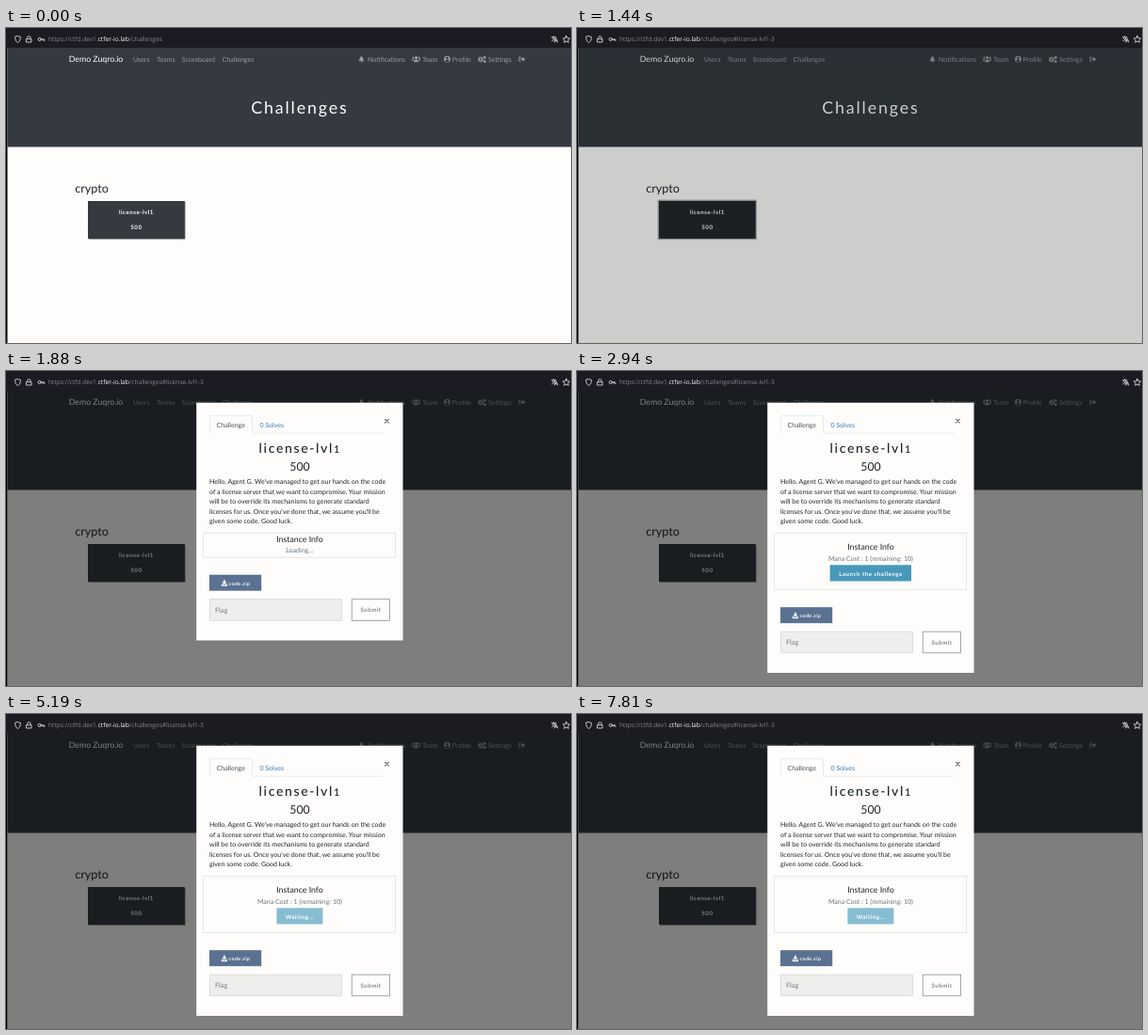
An HTML page that plays this animation: 600 px wide and 335 px high, repeating every 8000 ms.

```html
<!DOCTYPE html>
<html lang="en">
<head>
<meta charset="utf-8">
<title>Challenge page</title>
<style>
  html, body { margin: 0; width: 100%; height: 100%; overflow: hidden; background: #000; }
  svg { display: block; }
  text { font-family: Lato, sans-serif; font-size: 7.02px; text-rendering: geometricPrecision; white-space: pre; }
  .url { font-family: "Open Sans", sans-serif; font-size: 6.63px; fill: #87868c; }
  .nav { fill: #999c9f; }
  .nav text { font-size: 7.1px; }
  .line { fill: none; stroke-width: .9; stroke-linecap: round; stroke-linejoin: round; }
  .mid { text-anchor: middle; }
  .btn { font-size: 6.14px; font-weight: 700; letter-spacing: .5px; text-anchor: middle; }
  .h3 { font-size: 12.28px; }
  .h5 { font-size: 8.77px; text-anchor: middle; }
  .shadow { filter: drop-shadow(1.3px 1.3px .7px #808080); }
</style>
</head>
<body>
<svg width="600" height="335" viewBox="0 0 600 335">
  <!-- browser bar -->
  <rect width="600" height="21" fill="#1c1b22"/>
  <g class="line" stroke="#d5d5da">
    <path d="M12.5 8.6l2.9 1c0 3-.8 4.700-2.900 5.900c-2.100-1.200-2.900-2.900-2.900-5.900z"/>
    <path d="M22.800 11.500v-1.300a1.600 1.600 0 0 1 3.200 0v1.300M21.800 11.700h5.200v3.300h-5.200z"/>
    <path d="M37.500 12h3.300v1.500M39 12v1.200"/><circle cx="35.700" cy="12" r="1.600"/>
    <path d="M579.500 9.800h4.500M581.700 8.800v1M583.300 9.800c-.5 2-1.800 3.200-3.500 4M580.300 10.500c.6 1.400 1.500 2.200 2.500 2.800M582.500 15l1.700-4l1.700 4M583.200 13.800h2"/>
    <path d="M595 8.300l1.100 2.400l2.600.3l-1.900 1.800l.5 2.600l-2.300-1.300l-2.300 1.300l.5-2.600l-1.900-1.800l2.600-.3z"/>
  </g>
  <text class="url" x="45" y="14.300">https://ctfd.dev1.<tspan fill="#fbfbfe">ctfer-io.lab</tspan>/challenges<tspan id="hash">#license-lvl1-3</tspan></text>

  <!-- page -->
  <rect x="1.500" y="21" width="600" height="314" fill="#fefdfb"/>
  <rect x="1.500" y="21" width="600" height="105.500" fill="#343a40"/>
  <text x="66.700" y="36.300" fill="#fff" style="font-size:8.770px">Demo Zuqro.io</text>
  <g class="nav">
    <text x="135" y="35.800">Users</text>
    <text x="160" y="35.800">Teams</text>
    <text x="186.700" y="35.800">Scoreboard</text>
    <text x="229.600" y="35.800">Challenges</text>
    <text x="384" y="35.800">Notifications</text>
    <text x="442" y="35.800">Team</text>
    <text x="473.800" y="35.800">Profile</text>
    <text x="512" y="35.800">Settings</text>
    <path d="M374.600 35.200c1.200-1 .8-4.500 2.500-4.800v-.6h.8v.6c1.700.3 1.300 3.800 2.500 4.800zM376.600 35.700h1.800a.9.9 0 0 1-1.800 0z"/>
    <circle cx="435.600" cy="31.600" r="1.600"/><circle cx="432.500" cy="31.500" r="1"/><circle cx="438.700" cy="31.500" r="1"/>
    <path d="M432.900 36.300c0-3.600 5.400-3.600 5.400 0zM431 34.800c0-2 1.600-2.200 2.300-1.700l-1 1.700zM440.200 34.800c0-2-1.600-2.200-2.300-1.700l1 1.700z"/>
    <circle cx="468.500" cy="33.200" r="3.400"/>
    <g fill="#343a40"><circle cx="468.500" cy="32" r="1.300"/><path d="M466.300 35.400c.3-2.200 4.100-2.200 4.400 0c-1.300 1.100-3.100 1.100-4.400 0z"/></g>
    <g fill="none" stroke="#999c9f" stroke-width="1.200">
      <circle cx="504" cy="33.400" r="1.600"/><circle cx="508.300" cy="31.300" r=".9"/><circle cx="508.300" cy="35.400" r=".9"/>
      <circle cx="504" cy="33.400" r="2.500" stroke-dasharray="1 .960"/>
    </g>
    <path d="M546.800 30.600h-1.600q-.8 0-.8.800v3.600q0 .8.800.800h1.600v-.9h-1.400v-3.400h1.400zM546.700 32.300h2v-1.600l2.700 2.500l-2.700 2.500v-1.600h-2z"/>
  </g>
  <text x="260.200" y="90.500" fill="#fff" style="font-size:17.800px;letter-spacing:1.900px">Challenges</text>
  <text class="h3" x="73.200" y="174.500" fill="#212529" style="font-size:12.600px">crypto</text>
  <rect id="cardShadow" class="shadow" x="87" y="184" width="102.500" height="39.800" fill="#343a40"/>
  <rect id="ring" x="86.300" y="183.300" width="103.900" height="41.200" fill="none" stroke="#a8abad" stroke-width="1.400"/>
  <rect x="87" y="184" width="102.500" height="39.800" fill="#343a40"/>
  <rect id="cardHover" x="87" y="184" width="102.500" height="39.800" fill="#23272b"/>
  <g fill="#fff">
    <text class="btn" x="138.400" y="198.400">license-lvl1</text>
    <text class="btn" x="138.400" y="214.200">500</text>
  </g>
  <rect id="backdrop" x="1.500" y="21" width="600" height="314"/>

  <!-- dialog -->
  <g id="modal">
    <rect id="panel" x="202.200" y="33.700" width="219.300" height="252.800" fill="#fefdfb"/>
    <path d="M216.500 66.200v-18.500h45v18.500h139.500" fill="none" stroke="#dee2e6" stroke-width=".7"/>
    <text x="223.600" y="59.500" fill="#495057">Challenge</text>
    <text x="269.400" y="59.500" fill="#337ab7">0 Solves</text>
    <path class="line" d="M402.500 51.400l3.800 3.800m0-3.800l-3.800 3.800" stroke="#666" style="stroke-width:1.100"/>
    <g fill="#212529">
      <text x="268.600" y="87.300" style="font-size:14.030px;letter-spacing:1.650px;font-weight:500">license-lvl<tspan style="font-size:10.800px">1</tspan></text>
      <text class="h3 mid" x="312" y="105.800">500</text>
      <text x="216" y="120.100">Hello, Agent G. We've managed to get our hands on the code</text>
      <text x="216" y="130.700">of a license server that we want to compromise. Your mission</text>
      <text x="216" y="141.200">will be to override its mechanisms to generate standard</text>
      <text x="216" y="151.800">licenses for us. Once you've done that, we assume you'll be</text>
      <text x="216" y="162.300">given some code. Good luck.</text>
    </g>
    <rect id="infoBox" x="209.700" y="172.600" width="204" height="25.600" fill="none" stroke="#dedddc" stroke-width=".7"/>
    <g id="loading">
      <text class="h5" x="312" y="181.700" fill="#212529">Instance Info</text>
      <text class="mid" x="311.700" y="193.300" fill="#6c757d">Loading...</text>
    </g>
    <g id="ready">
      <text class="h5" x="312" y="190.400" fill="#212529">Instance Info</text>
      <text class="mid" x="311.900" y="201.900" fill="#6c757d">Mana Cost : 1 (remaining: 10)</text>
      <g id="launch">
        <rect x="268.600" y="206.300" width="86.400" height="17.200" fill="#4799ba"/>
        <text class="btn" x="312" y="217.500" fill="#fff">Launch the challenge</text>
      </g>
      <g id="waiting">
        <rect x="287.400" y="206.300" width="49" height="17.200" fill="#87bdd2"/>
        <text class="btn" x="312" y="217.500" fill="#fff">Waiting...</text>
      </g>
    </g>
    <g id="lower">
      <rect x="216" y="216.700" width="55.200" height="17" fill="#5b7191"/>
      <path d="M231 222.200h1.800v2.200h1.800l-2.700 2.600l-2.700-2.600h1.800zM228.800 226.600h1.500l1.600 1.400l1.600-1.400h1.500v2.100h-6.200z" fill="#fff"/>
      <text class="btn" x="248" y="227.700" fill="#fff" style="font-size:5.200px">code.zip</text>
      <rect x="216.500" y="242.700" width="140" height="22.600" fill="#efeeed" stroke="#d3d3d3" stroke-width=".7"/>
      <text x="222" y="256.800" fill="#777b7f" style="font-size:7.400px">Flag</text>
      <rect x="367.200" y="242.700" width="40.200" height="22.600" fill="none" stroke="#8b9196" stroke-width=".8"/>
      <text class="btn" x="387.500" y="256.300" fill="#7f868c">Submit</text>
    </g>
  </g>
</svg>
<script>
  const LOOP = 8000, STEP = 62.5;
  const OPEN = 1570, LOADED = 2100, CLICKED = 4750;
  const el = id => document.getElementById(id);
  const ramp = (t, start, length = 150) => Math.min(1, Math.max(0, (t - start) / length));
  const fade = (id, opacity) => el(id).setAttribute('opacity', opacity);
  const show = (id, on) => fade(id, on ? 1 : 0);
  const easeOut = x => 1 - (1 - x) ** 2;

  function draw(t) {
    const focus = ramp(t, 1000) - ramp(t, 1650);
    const loaded = t >= LOADED;

    show('hash', t >= 1370);
    fade('cardHover', ramp(t, 350) - ramp(t, 1650));
    fade('cardShadow', 1 - focus);
    fade('ring', focus);
    fade('backdrop', ramp(t, 1380) / 2);

    fade('modal', ramp(t, OPEN));
    el('modal').setAttribute('transform', `translate(0 ${-22 * (1 - easeOut(ramp(t, OPEN, 300)))})`);
    el('panel').setAttribute('height', loaded ? 287.3 : 252.8);
    el('infoBox').setAttribute('height', loaded ? 60.1 : 25.6);
    el('lower').setAttribute('transform', `translate(0 ${loaded ? 34.5 : 0})`);
    show('loading', !loaded);
    show('ready', loaded);
    show('launch', t < CLICKED);
    show('waiting', t >= CLICKED);
  }

  function tick() {
    const t = performance.now() % LOOP;
    draw(Math.floor((t + 5) / STEP) * STEP % LOOP);
    requestAnimationFrame(tick);
  }
  tick();
</script>
</body>
</html>
```
